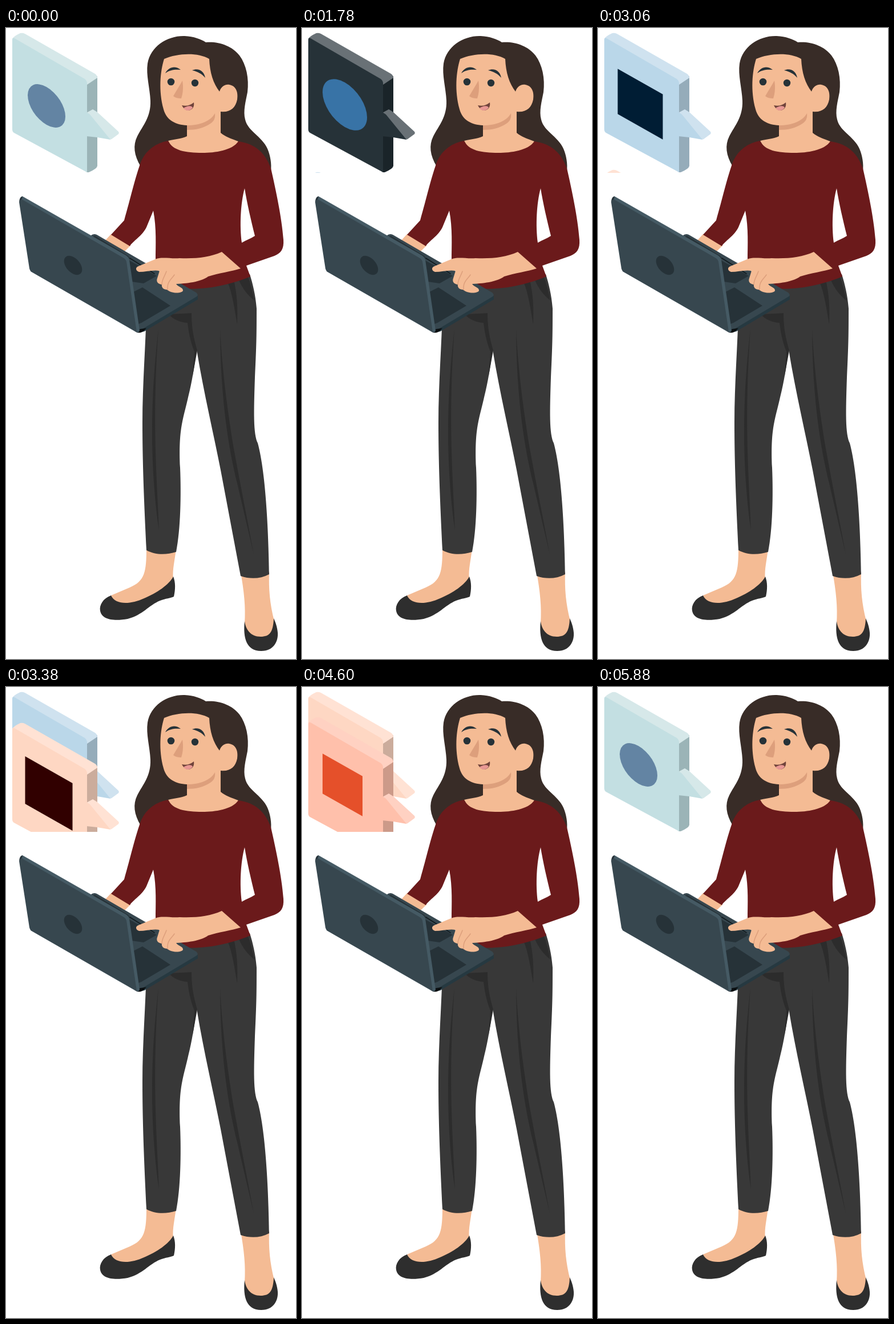
Write an HTML page with a canvas that moves like this. It is 508 px wide and 1102 px high and loops after 5960 ms.

```html
<!DOCTYPE html>
<html lang="en">
<head>
<meta charset="utf-8">
<title>Skills</title>
<style>
  html, body { margin: 0; width: 100%; height: 100%; overflow: hidden; background: #fff; }
  canvas { display: block; width: 100vw; height: 100vh; }
</style>
</head>
<body>
<canvas id="stage"></canvas>
<script>
const W = 508, H = 1102, LOOP = 5960;
const canvas = document.getElementById('stage');
const ctx = canvas.getContext('2d');
const ratio = Math.max(1, window.devicePixelRatio || 1);
canvas.width = W * ratio;
canvas.height = H * ratio;

const SKIN = '#f4bb94', SHADE = '#dd9f7c', HAIR = '#382c27', RED = '#6b1a1b';
const PANTS = '#383838', FOLD = '#2c2c2c', SHOE = '#2e2e2e';
const STEEL = '#37474f', NAVY = '#263238';

// [colour, path, optional line width], back to front
const figure = [
  // hair, neck, face
  [HAIR, 'M236 242C224 222 222 205 230 189C240 170 254 155 253 127C252 105 245 82 248 62C253 32 283 13 313 14C329 15 341 19 350 25C372 23 396 31 409 48C421 64 426 88 423 112C420 128 415 145 419 160C424 182 452 190 460 216C464 228 466 242 463 256L420 225L260 215Z'],
  [SKIN, 'M317 165V189C306 194 295 194 284 197L300 225H390L407 198C394 193 384 190 376 183V140Z'],
  [SKIN, 'M277 54C300 44 336 42 356 54C357 78 363 97 374 111C377 102 384 98 391 99C403 101 407 112 405 125C402 140 392 148 376 146L366 150C356 164 340 170 317 170C297 169 281 161 276 142C267 110 270 76 277 54Z'],
  [SHADE, 'M317 170C340 170 358 163 366 149C367 158 364 163 358 167C346 175 333 178 317 178Z'],
  [SHADE, 'M309 92C311 103 310 115 307 123C302 123 297 122 293 119C298 110 304 101 309 92Z'],
  [NAVY, 'M279 79C285 68 296 65 306 73C296 72 287 73 279 79Z'],
  [NAVY, 'M326 74C337 69 347 75 349 87C343 80 336 76 326 74Z'],
  [NAVY, 'M295.300 94A6.300 6.300 0 1 1 282.700 94A6.300 6.300 0 1 1 295.300 94Z'],
  [NAVY, 'M337.200 96A6.200 6.200 0 1 1 324.800 96A6.200 6.200 0 1 1 337.200 96Z'],
  ['#70433b', 'M308 135C316 137 323 135 329 130C330 136 328 141 323 143C317 146 311 141 308 135Z'],
  ['#e99894', 'M311 140C315 137 324 134 327 139C323 145 315 146 311 140Z'],

  // feet
  [SKIN, 'M246 908C246 950 243 966 217 977L184 991C194 1018 240 1008 262 993L293 962C291 945 296 930 298 908Z'],
  [SHOE, 'M184 991C170 996 163 1008 165 1018C168 1034 190 1036 213 1032C240 1025 250 1008 270 1000C280 996 288 996 294 993C297 980 297 968 293 958C286 972 264 987 242 996C218 1007 192 1008 184 991Z'],
  [SKIN, 'M411 950C417 985 420 1010 418 1040C422 1086 471 1086 470 1036C462 1005 460 980 461 950Z'],
  [SHOE, 'M418 1036C415 1065 421 1088 447 1088C470 1088 477 1070 476 1056C475 1045 472 1038 469 1031C468 1055 462 1063 446 1063C428 1063 420 1050 418 1036Z'],

  // trousers
  [PANTS, 'M246 490C245 550 239 620 239 690C239 770 243 850 246 912C262 921 282 920 298 915C306 875 307 815 305 768C302 700 310 685 319 645C326 618 330 590 334 562C347 640 364 710 376 772L411 957C428 963 446 962 461 954C460 890 456 780 441 725C433 709 434 670 436 610C439 550 439 530 439 490C437 465 432 446 427 430H290Z'],
  [FOLD, 'M267 526C260 590 246 720 268 877C265 790 255 690 267 526Z'],
  [FOLD, 'M375 527C376 650 390 735 405 795L434 919C423 860 409 790 398 729C387 660 379 600 375 527Z'],
  [FOLD, 'M285 500L325 498C325 530 331 548 335 563L327 607C328 590 329 575 330 565C322 545 320 530 318 515C305 514 293 509 285 500Z'],
  [FOLD, 'M388 443C397 465 400 490 405 517C406 490 405 465 399 440Z'],
  [FOLD, 'M407 438C414 455 422 465 435 476C432 460 428 445 423 432Z'],

  // far forearm, sweater
  [SKIN, 'M184 360L218 380L205 393L172 373Z'],
  [RED, 'M284 197C262 201 246 213 237 232C227 258 218 298 207 336L184 361L217 381C222 372 239 363 246 348L258 319C264 350 262 380 262 405L300 454C345 460 395 448 428 434L421 415L470 398C482 393 487 386 486 370C483 330 472 280 464 245C455 220 438 202 407 198C396 214 366 218 344 218C314 218 292 214 284 197Z'],
  ['#fff', 'M418 280C411 305 409 345 413 375C421 370 429 368 436 363C429 335 422 305 418 280Z'],

  // laptop base
  ['#263941', 'M148 362L336 468V474L242 530L230 532Z'],
  [STEEL, 'M148 363Q153 358 159 361L333 462Q338 466 334 469L240 525L228 526Z'],
  [NAVY, 'M156 363L214 398L218 404L150 365Z'],
  [NAVY, 'M216 406L264 433L241 446L220 443Z'],
  [NAVY, 'M221 462L239 453L288 485L237 515L229 518Z'],
  ['#111a1e', 'M217 402L260 429', 1.5],
  ['#0b0f11', 'M224 528L246 524L240 530Q234 534 228 531Z'],

  // laptop lid
  ['#455a64', 'M24 301Q25 294 29 294L210 397Q215 400 216 405L234 528Q233 533 228 531L43 425Z'],
  [NAVY, 'M23 303Q24 295 29 294L27 302Z'],
  [STEEL, 'M23 304Q25 298 29 300L205 401Q210 404 211 408L229 531L47 427Q42 425 41 420Z'],

  // near hand
  [SKIN, 'M378 391L411 420C396 425 372 428 354 434C344 442 322 446 298 447C301 452 311 453 310 459C307 464 290 464 282 457C276 457 272 453 273 448C265 447 263 442 265 437L269 424C257 422 245 426 233 426C227 424 226 418 232 416L261 404C272 399 286 403 304 402C332 403 356 401 378 391Z'],
  [SHADE, 'M281 425C278 434 273 439 273 448', 1.5],
  [SHADE, 'M295 431C290 439 282 442 283 457', 1.5]
].map(([color, d, line]) => ({ color, path: new Path2D(d), line }));

const face = new Path2D('M11 21Q11 16 15 18L138 89Q142 92 142 97V252L14 183Q11 181 11 177Z');
const topEdge = new Path2D('M11 19Q14 14 25 9Q29 8 33 10L156 80Q160 83 160 87L142 99L136 92Z');
const side = new Path2D('M141 94L160 84V241Q159 246 145 252L141 252Z');
const tail = new Path2D('M141 148L152 142L160 147L197 181Q199 184 196 186L185 194Q183 195 181 194Z');
const tailFace = new Path2D('M141 147L147 151L183 195L160 191L141 189Z');

const card = (front, top, edge, mark) => ({ front, top, edge, mark });
const mark = (shape, color, x, y, size) => ({ shape, color, x, y, size });
const cards = [
  card('#c3dfe2', '#d6e8e9', '#9bb4b7', mark('circle', '#6384a3', 71, 136, 66)),
  card('#263238', '#697176', '#1a2429', mark('circle', '#3873a6', 75, 134, 78)),
  card('#bad7e9', '#cfe2ef', '#95acba', mark('square', '#001d34', 74, 133, 79)),
  card('#fed7c3', '#ffe2d4', '#cbac9c', mark('square', '#310000', 75, 132, 83)),
  card('#ffc0ab', '#ffd1c2', '#cc9a89', mark('square', '#e5502a', 71, 127, 70))
];

// each slide brings in the next card: start, end, steps, first-step lead
const slides = [
  [640, 1230, 8, 0.4],
  [1780, 2330, 8, 0.4],
  [3060, 3520, 7, 0.6],
  [4190, 4750, 8, 0.4],
  [5390, 5880, 7, 0.4]
];
const TRAVEL = 245;
const smooth = x => x * x * (3 - 2 * x);

function fill(color, path) {
  ctx.fillStyle = color;
  ctx.fill(path);
}

function drawMark({ shape, color, x, y, size }) {
  const r = size / 2;
  ctx.save();
  ctx.transform(1, 0.565, 0, 1, x, y);
  ctx.fillStyle = color;
  ctx.beginPath();
  if (shape === 'circle') ctx.arc(0, 0, r, 0, Math.PI * 2);
  else ctx.rect(-r, -r, size, size);
  ctx.fill();
  ctx.restore();
}

function drawCard(c, dy) {
  ctx.save();
  ctx.translate(0, dy);
  fill(c.edge, side);
  fill(c.top, topEdge);
  fill(c.top, tail);
  fill(c.front, tailFace);
  fill(c.front, face);
  drawMark(c.mark);
  ctx.restore();
}

function drawBubble(t) {
  let current = 0, offset = 0;
  slides.forEach(([start, end, steps, lead], i) => {
    if (t < start) return;
    const last = steps - 1;
    const step = Math.min(last, Math.floor((t - start) / (end - start) * last + 0.3));
    current = i + 1;
    offset = Math.round(TRAVEL * (1 - smooth((step + lead) / (last + lead))));
  });
  ctx.save();
  ctx.beginPath();
  ctx.rect(11, 8, 188, 245);
  ctx.clip();
  if (offset) drawCard(cards[current - 1], 0);
  drawCard(cards[current % cards.length], offset);
  ctx.restore();
}

function drawFigure() {
  ctx.lineCap = 'round';
  for (const { color, path, line } of figure) {
    if (line) {
      ctx.strokeStyle = color;
      ctx.lineWidth = line;
      ctx.stroke(path);
    } else fill(color, path);
  }
  ctx.fillStyle = NAVY;
  ctx.beginPath();
  ctx.ellipse(117.5, 414.5, 19.5, 12, 0.84, 0, Math.PI * 2);
  ctx.fill();
}

let origin;
function frame(now) {
  origin ??= now;
  ctx.setTransform(ratio, 0, 0, ratio, 0, 0);
  ctx.fillStyle = '#fff';
  ctx.fillRect(0, 0, W, H);
  drawFigure();
  drawBubble((now - origin) % LOOP);
  requestAnimationFrame(frame);
}
requestAnimationFrame(frame);
</script>
</body>
</html>
```
